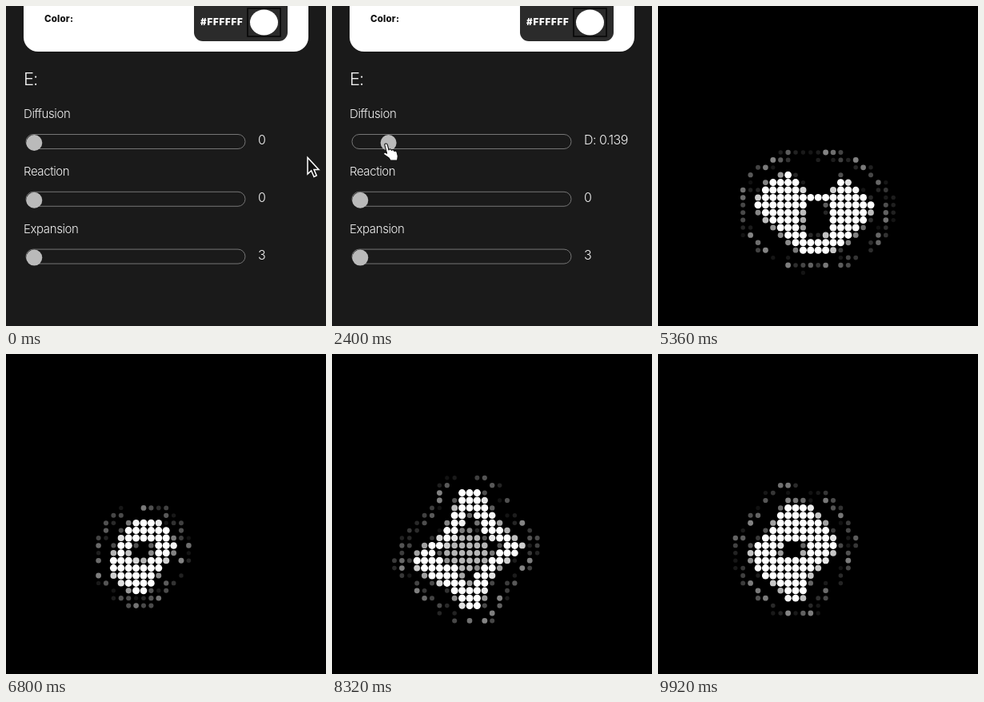
Write an HTML page with a canvas that moves like this. It is 400 px wide and 400 px high and loops after 10 s.

```html
<!DOCTYPE html>
<html lang="en">
<head>
<meta charset="utf-8">
<title>Diffusion controls</title>
<style>
  html, body { margin: 0; width: 100%; height: 100%; overflow: hidden; background: #000; }
  svg, canvas { position: absolute; left: 0; top: 0; width: 400px; height: 400px; }
  text { font-family: Inter, "Liberation Sans", sans-serif; font-weight: 300; fill: #f2f2f2; }
  .label { font-size: 15px; letter-spacing: -.4px; }
  .value { font-size: 16px; letter-spacing: -.5px; }
  .bold { font-weight: 800; font-size: 11.5px; }
  .track { fill: none; stroke: #757575; stroke-width: 1; }
  .knob { fill: #bababa; }
</style>
</head>
<body>
<canvas id="dots" width="400" height="400"></canvas>
<svg id="panel" viewBox="0 0 400 400">
  <rect width="400" height="400" fill="#1a1a1a"/>
  <rect x="22" y="-40" width="356" height="97" rx="18" fill="#fff"/>
  <text class="bold" x="48" y="20" letter-spacing=".2" style="fill:#111">Color:</text>
  <rect x="235" y="-20" width="117" height="64" rx="11" fill="#2b2b2b"/>
  <text class="bold" x="243" y="24" letter-spacing=".8" style="fill:#fff;font-weight:900">#FFFFFF</text>
  <rect x="302" y="3" width="41" height="35" fill="none" stroke="#050505" stroke-width="1.5"/>
  <ellipse cx="322.5" cy="20.5" rx="17.5" ry="16" fill="#fff"/>
  <text x="22" y="99" font-size="22" letter-spacing="-1">E:</text>
  <g id="sliders"></g>
  <g id="ring" fill="none">
    <circle r="40.2" stroke="#e8e8e8" stroke-width="4.2"/>
    <circle r="40.2" stroke="#1a1a1a" stroke-width="2.4"/>
  </g>
  <path id="arrow" d="M0 0V20.5L4.6 16.3 8 24 11.2 22.5 8 15H14Z" fill="#111" stroke="#fff" stroke-width="1.5"/>
  <path id="hand" d="M-1.8 1.6Q-1.6 -.4 .3 0Q1.5 .3 1.9 2L3.4 8Q4 6.3 6 7.2L6.8 8.4Q8 7 9.7 8.4L10.3 9.6Q12.7 8.4 13.6 11L14.7 15.5L14 21H5.5L3.6 18L-2.6 13.6Q-3.8 11.4 -1.2 11L1 12.2Z" fill="#fff" stroke="#111" stroke-width="1.1" stroke-linejoin="round"/>
</svg>
<script>
const LOOP = 10000, PANEL_END = 4800, RESTART = 5760;
const PITCH = 9.4, X0 = 2.8, Y0 = 4.4, COUNT = 43, TAU = Math.PI * 2;
const $ = id => document.getElementById(id);
const clamp = v => Math.max(0, Math.min(1, v));
const mix = (a, b, p) => a + (b - a) * p;
const ease = p => p * p * (3 - 2 * p);
const span = (t, a, b) => ease(clamp((t - a) / (b - a)));

// Control panel
const rows = ["Diffusion", "Reaction", "Expansion"].map((name, i) => {
  const y = 72 * i, mid = 169.5 + 71.8 * i, g = $("sliders");
  g.insertAdjacentHTML("beforeend",
    `<text class="label" x="22" y="${140 + y}">${name}</text>
     <rect class="track" x="25" y="${mid - 9}" width="274" height="18" rx="9"/>
     <circle class="knob" cx="35.5" cy="${mid + 1.5}" r="10"/>
     <text class="value" x="315" y="${173 + y}"></text>`);
  return { knob: g.querySelectorAll(".knob")[i], value: g.querySelectorAll(".value")[i] };
});

function setRow(i, x, text) {
  rows[i].knob.setAttribute("cx", x);
  rows[i].value.textContent = text;
}

function place(node, x, y, scale = 1) {
  node.setAttribute("transform", `translate(${x} ${y}) scale(${scale})`);
}

function show(node, on) { node.style.display = on ? "" : "none"; }

function drawPanel(t) {
  const diffusion = .139 * span(t, 780, 1180);
  const expansion = 3 + 5 * span(t, 3120, 3600);
  const dx = 35.3 + 254 * diffusion, ex = 35.3 + 14.94 * (expansion - 3);
  setRow(0, dx, diffusion > 0 ? "D: " + diffusion.toFixed(3) : "0");
  setRow(1, 35.3, "0");
  setRow(2, ex, expansion > 3 ? "S: " + Math.round(expansion) : "3");

  const go = span(t, 80, 680), next = span(t, 2400, 3000);
  let x = mix(377, dx - 3, go), y = mix(189.5, 172, go);
  if (t > 2400) {
    x = mix(dx - 3, ex - 3, next);
    y = mix(172, 314, next);
  }
  const over = (t > 640 && t < 2480) || t > 2940;
  show($("arrow"), !over);
  show($("hand"), over);
  place($(over ? "hand" : "arrow"), x, y);

  const first = t > 720 && t < 2160, second = t > 3060 && t < 4360;
  show($("ring"), first || second);
  const pop = mix(.6, 1, span(t, first ? 720 : 3060, first ? 840 : 3180));
  place($("ring"), first ? dx - 1 : ex - 1, first ? 169 : 312.5, pop);
}

// Growth shapes: outlines as x, y pairs, clockwise from the right.
// halo = [cx, cy, rx, ry]; round = how far the halo follows that oval
// instead of the outline; core = radius of the grey middle.
const cup = {
  at: [198, 256], halo: [196, 254, 93, 73], round: .85, core: 0,
  outer: [271, 249, 262, 268, 250, 282, 232, 300, 213, 309, 178, 309, 164, 296, 146, 278,
    129, 264, 120, 246, 134, 222, 162, 207, 176, 220, 188, 237, 213, 236, 231, 212],
  hole: [214, 262, 214, 281, 205, 290, 187, 290, 181, 279, 182, 258, 187, 244, 211, 244]
};
const bud = {
  at: [167, 246], halo: [167, 248, 54, 58], round: .4, core: 0,
  outer: [213, 242, 204, 255, 196, 266, 187, 282, 178, 297, 162, 301, 145, 290, 131, 275,
    131, 258, 137, 240, 143, 228, 150, 214, 167, 207, 190, 208, 204, 220, 209, 232],
  hole: [184, 246, 180, 253, 170, 259, 160, 256, 154, 249, 158, 240, 164, 235, 183, 235]
};
const star = {
  at: [168, 246], halo: [168, 245, 80, 88], round: .3, core: 30,
  outer: [240, 240, 226, 255, 212, 264, 200, 280, 192, 298, 187, 319, 160, 316, 148, 294,
    122, 282, 98, 262, 110, 243, 135, 228, 148, 206, 160, 170, 186, 170, 206, 208],
  hole: [216, 240, 192, 256, 170, 290, 155, 264, 126, 251, 152, 236, 174, 194, 192, 228]
};
const gem = {
  at: [170, 244], halo: [172, 244, 75, 80], round: .4, core: 0,
  outer: [226, 238, 217, 254, 206, 264, 192, 276, 187, 292, 181, 308, 162, 308, 150, 292,
    132, 279, 117, 262, 114, 244, 132, 228, 147, 207, 160, 184, 187, 185, 210, 212],
  hole: [184, 242, 180, 252, 168, 257, 156, 254, 151, 246, 157, 237, 165, 233, 182, 234]
};

function blend(a, b, p) {
  const s = { core: mix(a.core, b.core, p), round: mix(a.round, b.round, p) };
  for (const k of ["at", "halo", "outer", "hole"]) s[k] = a[k].map((v, i) => mix(v, b[k][i], p));
  return s;
}

function scaled(s, k) {
  const grow = list => list.map((v, i) => mix(s.at[i % 2], v, k));
  const [cx, cy, rx, ry] = s.halo;
  return { ...s, core: s.core * k, outer: grow(s.outer), hole: grow(s.hole), halo: [cx, cy, rx * k, ry * k] };
}

const stages = [
  [RESTART, scaled(bud, .4)], [6800, bud], [7600, gem],
  [8320, star], [8880, scaled(star, 1.07)], [9920, gem], [LOOP, gem]
];

function shapeAt(t) {
  if (t < RESTART) {
    const k = t < 5360 ? mix(.82, 1, (t - PANEL_END) / 560) : mix(1, 1.07, (t - 5360) / 400);
    return scaled(cup, k);
  }
  const i = stages.findIndex(s => s[0] > t);
  const [t0, a] = stages[i - 1], [t1, b] = stages[i];
  return blend(a, b, (t - t0) / (t1 - t0));
}

// Signed distance to a polygon, negative inside.
function distance(points, x, y) {
  let best = Infinity, inside = false;
  const n = points.length;
  for (let i = 0, j = n - 2; i < n; j = i, i += 2) {
    const ax = points[j], ay = points[j + 1];
    const ex = points[i] - ax, ey = points[i + 1] - ay, px = x - ax, py = y - ay;
    const p = clamp((px * ex + py * ey) / (ex * ex + ey * ey || 1));
    best = Math.min(best, Math.hypot(px - ex * p, py - ey * p));
    if ((ay > y) !== (points[i + 1] > y) && px < ex * py / ey) inside = !inside;
  }
  return inside ? -best : best;
}

function hash(i, j) {
  const v = Math.sin(i * 127.1 + j * 311.7) * 43758.5453;
  return v - Math.floor(v);
}

function level(s, x, y, noise, t) {
  const out = distance(s.outer, x, y), gap = distance(s.hole, x, y);
  const body = clamp(.6 - out / 8) * clamp(.6 + gap / 8);
  const mid = Math.hypot(x - s.at[0], y - s.at[1]);
  const core = gap < 0 ? .65 * clamp((s.core - mid) / 6) : 0;

  const [cx, cy, rx, ry] = s.halo;
  const r = Math.hypot(x - cx, y - cy), a = Math.atan2(y - cy, x - cx);
  const oval = 1 / Math.hypot(Math.cos(a) / rx, Math.sin(a) / ry);
  const band = out > 0 ? clamp(1.4 - Math.abs(mix(out - 17, r - oval, s.round)) / 6) : 0;
  const pulse = .5 + .5 * Math.sin(noise * 40 + t / 350);
  return Math.max(body, core, band * (.05 + .42 * pulse));
}

const ctx = $("dots").getContext("2d");

function drawDots(t) {
  ctx.fillStyle = "#000";
  ctx.fillRect(0, 0, 400, 400);
  const s = shapeAt(t);
  for (let j = 0; j < COUNT; j++) {
    for (let i = 0; i < COUNT; i++) {
      const x = X0 + i * PITCH, y = Y0 + j * PITCH;
      const v = level(s, x, y, hash(i, j), t);
      if (v < .06) continue;
      const g = Math.round(255 * Math.min(1, v * 1.1));
      ctx.fillStyle = `rgb(${g},${g},${g})`;
      ctx.beginPath();
      ctx.arc(x, y, 2.5 + 2 * v, 0, TAU);
      ctx.fill();
    }
  }
}

function frame() {
  const t = performance.now() % LOOP, panel = t < PANEL_END;
  show($("panel"), panel);
  (panel ? drawPanel : drawDots)(t);
  requestAnimationFrame(frame);
}
frame();
</script>
</body>
</html>
```
